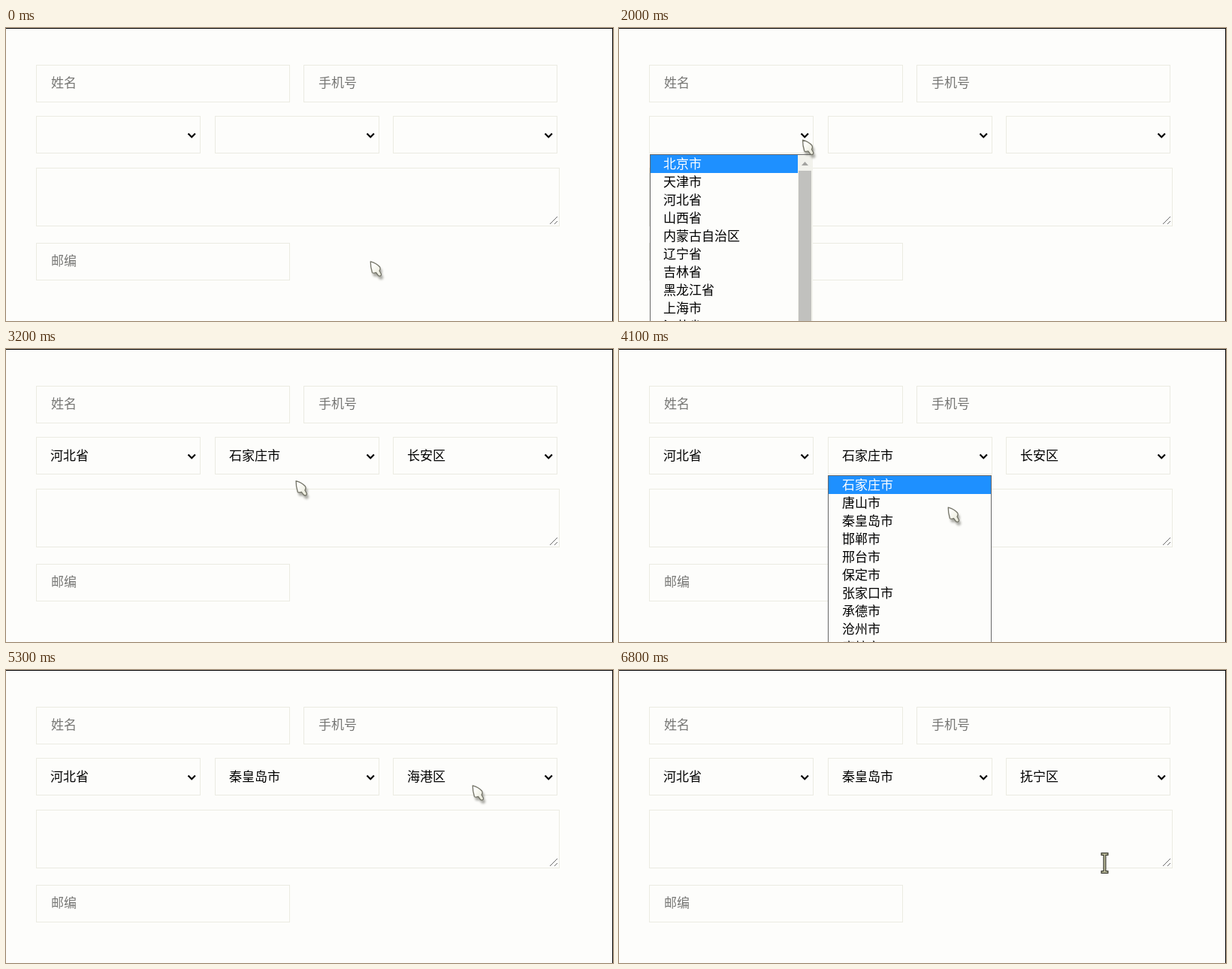
These frames come from a looping animation (808x390 px, 7.3 s). An HTML page:

```html
<!DOCTYPE html>
<html lang="zh-CN">
<head>
<meta charset="utf-8">
<title>地址表单</title>
<style>
  html, body { margin: 0; width: 100%; height: 100%; overflow: hidden; background: #fdfdfb; }
  svg { display: block; width: 808px; height: 390px; }
  text { font: 17px "Noto Sans CJK SC", "Noto Sans CJK", sans-serif; white-space: pre; }
  .hint { fill: #767674; }
  .field { fill: none; stroke: #ebebe2; shape-rendering: crispEdges; }
  .chevron { fill: none; stroke: #000; stroke-width: 2.2; }
  .grip { stroke: #6c6c6c; }
  .edge { fill: none; stroke: #686868; shape-rendering: crispEdges; }
  #arrow { filter: drop-shadow(2px 4px 1.5px rgba(70, 70, 60, .45)); }
</style>
</head>
<body>
<svg id="stage" viewBox="0 0 808 390">
  <defs>
    <linearGradient id="skin" x1="0" y1="0" x2="1" y2="1">
      <stop offset=".2" stop-color="#fffffc"/>
      <stop offset="1" stop-color="#e6e6d6"/>
    </linearGradient>
  </defs>
  <rect width="808" height="390" fill="#fdfdfb"/>
  <g id="form"></g>
  <g id="lists"></g>
  <path d="M0 .5H807.5V390" fill="none" stroke="#000" shape-rendering="crispEdges"/>
  <g id="arrow">
    <path d="M.7 .8C5 2 10 4.5 13 8C14.2 10 13.4 12 12.6 13.2L15 17.5C15.4 20.4 12.2 21 10.6 19L8 15.5C6 16 4 17 3 15.5C1.5 11 .7 6 .7 .8Z"
      fill="url(#skin)" stroke="#747468" stroke-width="1.3" stroke-linejoin="round"/>
  </g>
  <g id="beam" fill="none" stroke-linecap="square">
    <path d="M-3 -12H3M0 -12V12M-3 12H3" stroke="#34342a" stroke-width="4"/>
    <path d="M-3 -12H3M0 -12V12M-3 12H3" stroke="#ccccaa" stroke-width="1.6"/>
  </g>
</svg>
<script>
const LOOP = 7300, STEP = 100, ROW = 24, LIST_TOP = 169;
const $ = id => document.getElementById(id);

function add(parent, tag, attrs, content = '') {
  const el = document.createElementNS('http://www.w3.org/2000/svg', tag);
  for (const key in attrs) el.setAttribute(key, attrs[key]);
  el.textContent = content;
  return parent.appendChild(el);
}

const form = $('form');
const field = (x, y, w, h) =>
  add(form, 'rect', { x: x + .5, y: y + .5, width: w - 1, height: h - 1, class: 'field' });
const show = (el, on) => el.setAttribute('visibility', on ? 'visible' : 'hidden');

function input(x, y, hint) {
  field(x, y, 338, 50);
  add(form, 'text', { x: x + 20, y: y + 30, class: 'hint' }, hint);
}

input(40, 49, '姓名');
input(396, 49, '手机号');
input(40, 286, '邮编');
field(40, 186, 697, 78);
add(form, 'path', { d: 'M724 261L734 251M730 261L734 257', class: 'grip' });

// values: [time, text]; hover: [time, row]
const selects = [
  {
    x: 40, left: 41, right: 238, open: 1500, close: 2700, scroll: true,
    values: [[0, ''], [2700, '河北省']],
    hover: [[0, 0], [2200, 1], [2300, 2]],
    items: '北京市 天津市 河北省 山西省 内蒙古自治区 辽宁省 吉林省 黑龙江省 上海市 江苏省'
  },
  {
    x: 278, left: 278, right: 496, open: 3600, close: 4600, rightEdge: true,
    values: [[0, ''], [2700, '石家庄市'], [4600, '秦皇岛市']],
    hover: [[0, 0], [4200, 1], [4300, 2]],
    items: '石家庄市 唐山市 秦皇岛市 邯郸市 邢台市 保定市 张家口市 承德市 沧州市 廊坊市'
  },
  {
    x: 515, left: 516, right: 733, open: 5600, close: 6600,
    values: [[0, ''], [2700, '长安区'], [4600, '海港区'], [6600, '抚宁区']],
    hover: [[0, 0], [6000, 1], [6200, 2], [6300, 3]],
    items: '海港区 山海关区 北戴河区 抚宁区 青龙满族自治县 昌黎县 卢龙县 秦皇岛市经济技术开发区 北戴河新区'
  }
];

function build(s) {
  const { x, left, right } = s, textX = x + 19;
  field(x, 117, 219, 50);
  add(form, 'path', { d: `M${x + 202.5} 140.5l4.7 4.7 4.7-4.7`, class: 'chevron' });
  s.label = add(form, 'text', { x: textX, y: 148 });

  const names = s.items.split(' ');
  const bottom = LIST_TOP + names.length * ROW;
  const end = s.scroll ? 258 : right;
  s.list = add($('lists'), 'g', {});
  add(s.list, 'rect', { x: left, y: 168, width: end - left, height: bottom - 168, fill: '#fdfdfb' });
  s.bar = add(s.list, 'rect', {
    x: left + 1, width: right - left - 1, height: ROW, fill: '#1e90ff'
  });
  s.rows = names.map((name, i) =>
    add(s.list, 'text', { x: textX, y: LIST_TOP + 18 + i * ROW }, name));
  if (s.scroll) {
    add(s.list, 'rect', { x: 238, y: 169, width: 20, height: 221, fill: '#f2f2ec' });
    add(s.list, 'rect', { x: 239, y: 190, width: 17, height: 200, fill: '#c1c1be' });
    add(s.list, 'path', { d: 'M243 183l4.5-5 4.5 5z', fill: '#a3a3a0' });
  }
  const side = s.rightEdge ? `V${bottom}` : '';
  add(s.list, 'path', { d: `M${left + .5} ${bottom}V168.5H${end - .5}${side}`, class: 'edge' });
}
selects.forEach(build);

// Pointer moves: [start, steps, x, y]
const moves = [
  [700, 7, 247.5, 138], [2000, 5, 212, 237], [3100, 3, 446, 153],
  [3900, 3, 437.5, 210], [4200, 2, 436, 229], [5000, 4, 620.5, 153],
  [6000, 1, 628, 190], [6200, 3, 646.5, 257]
];

function pointer(t) {
  let x = 484.5, y = 310;
  for (const [start, steps, toX, toY] of moves) {
    if (t < start) break;
    const k = Math.min(1, ((t - start) / STEP + 1) / steps);
    const p = k * k * (3 - 2 * k);
    x += (toX - x) * p;
    y += (toY - y) * p;
  }
  return `translate(${x} ${y})`;
}

const latest = (list, t) => list.filter(([at]) => at <= t).pop()[1];

function draw(t) {
  for (const s of selects) {
    s.label.textContent = latest(s.values, t);
    show(s.list, t >= s.open && t < s.close);
    const active = latest(s.hover, t);
    s.bar.setAttribute('y', LIST_TOP + active * ROW);
    s.rows.forEach((row, i) => row.setAttribute('fill', i === active ? '#fff' : '#000'));
  }
  const place = pointer(t), typing = t >= 6600;
  for (const id of ['arrow', 'beam']) $(id).setAttribute('transform', place);
  show($('arrow'), !typing && t !== 6100);
  show($('beam'), typing);
}

const began = performance.now();
let last = -1;
function tick() {
  const t = Math.floor((performance.now() - began) % LOOP / STEP) * STEP;
  if (t !== last) draw(last = t);
  requestAnimationFrame(tick);
}
tick();
</script>
</body>
</html>
```
